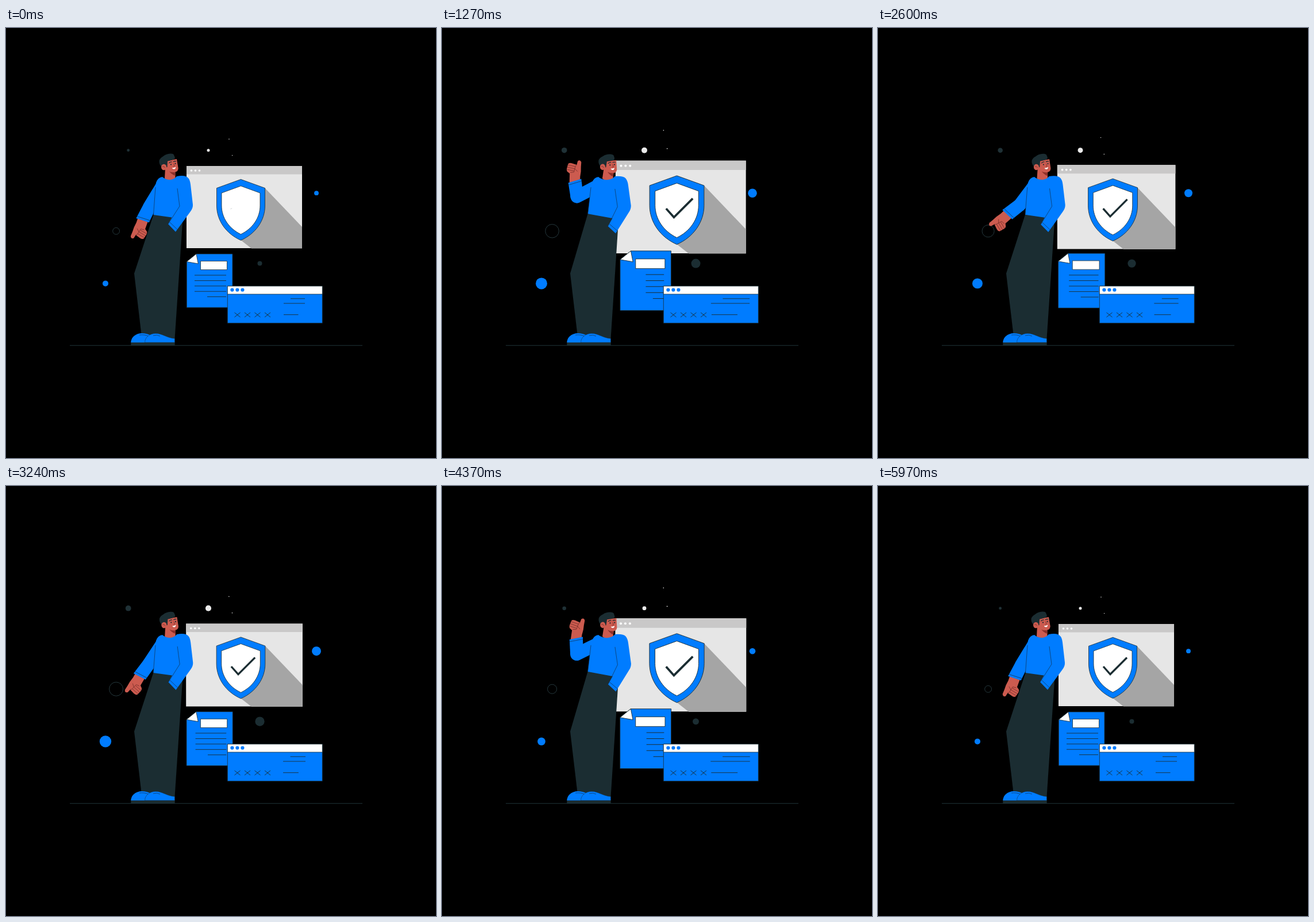
Animation of 748x748 px, one loop 6.01 s. Source, as an HTML page:

```html
<!DOCTYPE html>
<html lang="en">
<head>
<meta charset="utf-8">
<title>Security check</title>
<style>
  html, body { margin: 0; width: 100%; height: 100%; overflow: hidden; background: #000; }
  svg { display: block; width: 100vw; height: 100vh; }
  .blue { fill: #007cff; }
  .dark { fill: #1b2d32; }
  .skin { fill: #cc5b4f; }
  .white { fill: #fff; }
  .line { fill: none; stroke: #1b2d32; stroke-width: .9; }
  .thin { fill: none; stroke: #12324f; stroke-width: .7; }
  .crease { fill: none; stroke: #6e2a27; stroke-width: .7; stroke-linecap: round; }
  .edge { stroke: #1b2d32; stroke-width: .8; }
</style>
</head>
<body>
<svg viewBox="0 0 748 748">
  <g id="dots"></g>
  <path d="M111 552.2H620" stroke="#20363a" fill="none"/>

  <g id="screen">
    <path fill="#e6e6e6" d="M314 240H515V383H314Z"/>
    <path fill="#c9c8c8" d="M314 240H515V254.5H314Z"/>
    <g class="white">
      <circle cx="322.5" cy="248" r="1.8"/>
      <circle cx="329.5" cy="248" r="1.8"/>
      <circle cx="336.5" cy="248" r="1.8"/>
      <circle cx="388" cy="193.3" r=".7"/>
      <circle cx="393.6" cy="221.6" r=".7"/>
    </g>
    <path fill="#a5a5a5" d="M450.5 278.5L515 346V383.5H427L408.5 369Z"/>
    <path class="blue edge" d="M408.5 263.3L450.5 278.5V309C450.5 335 434 358 408.5 369.3C383 358 366.5 335 366.5 309V278.5Z"/>
    <path class="white edge" d="M408.5 274.8L442 287V309C442 330 429 349 408.5 358.8C388 349 375 330 375 309V287Z"/>
    <path id="tick" d="M392 314L404 327.5L433 298.5" pathLength="1" stroke-dasharray="1 2" fill="none" stroke="#1b2d32" stroke-width="3.3"/>
  </g>

  <g id="page">
    <path class="blue edge" d="M331 393H394V486.2H314.3V406.5Z"/>
    <path class="white edge" d="M314.3 406.5L331 393L334.3 410Z"/>
    <path class="white edge" d="M338.5 405.5H384.5V420.5H338.5Z"/>
    <path class="line" id="pageLines"/>
  </g>

  <g id="panel">
    <path class="blue edge" d="M385.3 449H550.3V513.3H385.3Z"/>
    <path class="white edge" d="M385.3 449H550.3V463H385.3Z"/>
    <g class="blue">
      <circle cx="393.4" cy="455.5" r="3.1"/>
      <circle cx="402.4" cy="455.5" r="3.1"/>
      <circle cx="411.4" cy="455.5" r="3.1"/>
    </g>
    <path class="line" id="crosses"/>
    <path class="line" id="panelLines"/>
  </g>

  <g id="man">
    <path class="dark" id="trousers"/>
    <path class="dark" d="M217.3 545.5H293.7V552H217.3Z"/>
    <path class="blue" d="M217.3 547C217.5 537 227 531 236 531Q246 531 254 536L262 547Z"/>
    <path class="blue edge" stroke-opacity=".6" d="M241.5 547C241.5 538 250 531.5 260 531.3C272 531.3 279 539 293.5 540.2V547Z"/>
    <path class="thin" d="M232 534Q242 533 247 536M256 535Q263 533 268 536"/>

    <g id="hand">
      <path class="skin" d="M-8 6L-12 -11L-17 -13Q-19 -15 -19 -18V-26Q-18 -29 -13 -29L-4 -28.5V-35Q-1 -39.5 2.5 -35L4 -27L6 -19L7 -10L10 2L8 8H-5Z"/>
      <path class="crease" d="M-18.5 -24.5L-6 -25M-18.5 -20.5L-6 -21M-18 -16.5L-6.5 -17M-4 -28.5L-5.5 -26V-15L-11 -13M-5.5 -21L0 -18"/>
    </g>
    <path id="upperArm" fill="none" stroke="#007cff" stroke-width="22.5" stroke-linecap="round"/>
    <g id="forearm">
      <path class="blue" d="M-11.2 0L-11.8 29.5L11.5 26L11.2 0Z"/>
      <path class="thin" d="M-11.6 25.7L11.4 22.2"/>
    </g>

    <g id="head">
      <path class="skin" d="M277 243L276 262Q284 268 294.5 262V250.5Q299.5 249.5 299.7 244L297 228L280 231Z"/>
      <path fill="#8e3029" d="M284 249.5Q288 251.8 294.5 250.8V257Q288 255 284 249.5Z"/>
      <path class="dark" d="M271 242Q266 237 266.5 231Q268 226 273 223.5Q278 219 286 218.6Q292 218.4 292.5 222Q294.5 225 293.5 227.5Q288 230.5 281 231.8L280.5 242L276 243Z"/>
      <ellipse class="skin" cx="274.6" cy="242" rx="4.6" ry="5.2"/>
      <path class="crease" d="M272.5 241Q275 239.5 276.5 243M291.5 236L293.3 240L291.5 240.5"/>
      <path d="M283.3 235.2Q285 232.6 288.5 232.8M291 232.8Q293 231 296 231.8" fill="none" stroke="#1b2d32" stroke-width="1.2"/>
      <circle class="dark" cx="287" cy="237.4" r="1.1"/>
      <circle class="dark" cx="294.6" cy="235.8" r="1.1"/>
      <path class="white" d="M288.8 243.3Q292 243.6 295.2 241.4Q295 245.3 292.2 245.6Q289.6 245.6 288.8 243.3Z"/>
    </g>
    <path class="blue" id="torso"/>
    <path class="thin" id="seams"/>
  </g>
</svg>

<script>
const LOOP = 6010;
const $ = id => document.getElementById(id);
const set = (id, name, value) => $(id).setAttribute(name, value);
const wave = (t, half) => (1 - Math.cos(Math.PI * t / half)) / 2;
const rad = deg => deg * Math.PI / 180;

// Mixes two paths that have the same commands.
function blend(from, to, k) {
  const ends = to.match(/-?[\d.]+/g);
  let i = 0;
  return from.replace(/-?[\d.]+/g, n => (+n + (ends[i++] - n) * k).toFixed(2));
}

const zoom = (id, x, y, s) =>
  set(id, 'transform', `translate(${x} ${y}) scale(${s}) translate(${-x} ${-y})`);

// Point reached from p along a limb; 0 degrees hangs down, positive swings left.
const reach = ([x, y], length, deg) =>
  [x - length * Math.sin(rad(deg)), y + length * Math.cos(rad(deg))];

const poses = {
  torso: [
    'M260 277L261 269Q264 260 272 259Q277 264 286 264Q293 263 297 258Q312 255 317 261Q320 264 321 272L325 307Q325.5 313 321 319L295 354.5L282 341L288.5 329.5L256.5 325Z',
    'M259 277L261 269Q264 260 272 259Q279 265 289 264Q297 263 301 258Q316 257 320 262Q323 266 324 273L329 309Q329 316 325 321L302.5 357.5L289 345L297 331L253.5 323Z'
  ],
  seams: [
    'M260 277L256.5 325M298 279L302 310L282 341M284.5 337.5L298 350.5',
    'M259 277L253.5 323M301 280L305.5 311L289 345M291.5 341L305.5 353'
  ],
  trousers: [
    'M257.5 322L300 325L307.5 331L293.5 541L235.5 533L223 427Z',
    'M254 321L300 325L307 335L293.5 541L235.5 533L223 427Z'
  ],
  pageLines: [
    'M328 430L383 430M328 439.5L383 439.5M328 448.8L383 448.8M328 458.2L383 458.2M350 467.5L383 467.5',
    'M356 430L383 430M356 439.5L383 439.5M356 448.8L383 448.8M356 458.2L383 458.2M366.5 467.5L383 467.5'
  ],
  panelLines: [
    'M495 470.8L520 470.8M483 479L520 479M483 498.7L508.5 498.7',
    'M488 470.8L536 470.8M467 479L536 479M468 498.7L514.3 498.7'
  ]
};

// x, y, smallest radius, fill, stroke
const dots = [
  [212.7, 212.7, 2.4, '#1f3136'],
  [352, 212.7, 2.5, '#ebebeb'],
  [540, 287.2, 3.9, '#007cff'],
  [441.5, 409.6, 4, '#1b2d32'],
  [173, 444.4, 5, '#007cff'],
  [191.6, 353.2, 5.9, 'none', '#25383d']
].map(([cx, cy, r, fill, stroke = 'none']) => {
  const el = document.createElementNS('http://www.w3.org/2000/svg', 'circle');
  Object.entries({ cx, cy, fill, stroke }).forEach(([k, v]) => el.setAttribute(k, v));
  $('dots').append(el);
  return { el, r };
});

set('crosses', 'd', [402.5, 420, 437.5, 455]
  .map(x => `M${x - 5} 495L${x + 5} 503M${x + 5} 495L${x - 5} 503`).join(''));

function drawArm(k) {
  const shoulder = [272, 274];
  const bend = 26.6 + 154 * k;
  const elbow = reach(shoulder, 42, 31.4 + 33 * k);
  const wrist = reach(elbow, 27, bend);
  set('upperArm', 'd', `M${shoulder}L${elbow}`);
  set('forearm', 'transform', `translate(${elbow}) rotate(${bend})`);
  set('hand', 'transform', `translate(${wrist}) rotate(${171.5 * (k - 0.857)})`);
}

function draw(t) {
  const k = wave(t, 1500);
  const swell = 1 + 1.2 * wave(t, 1000);
  const drawn = 1 - Math.pow(1 - Math.min(t / 1000, 1), 2.2);

  for (const { el, r } of dots) el.setAttribute('r', r * swell);
  for (const id in poses) set(id, 'd', blend(...poses[id], k));
  zoom('screen', 408.5, 313, 1 + 0.136 * k);
  zoom('page', 354, 439.5, 1 + 0.117 * k);
  set('tick', 'stroke-dashoffset', 1 - drawn);
  set('tick', 'visibility', drawn > 0 ? 'visible' : 'hidden');
  set('head', 'transform', `translate(${3 * k} ${0.6 * k}) rotate(${6 * k} 284 262)`);
  drawArm(k);
}

const start = performance.now();
function tick() {
  draw((performance.now() - start) % LOOP);
  requestAnimationFrame(tick);
}
draw(0);
requestAnimationFrame(tick);
</script>
</body>
</html>
```
